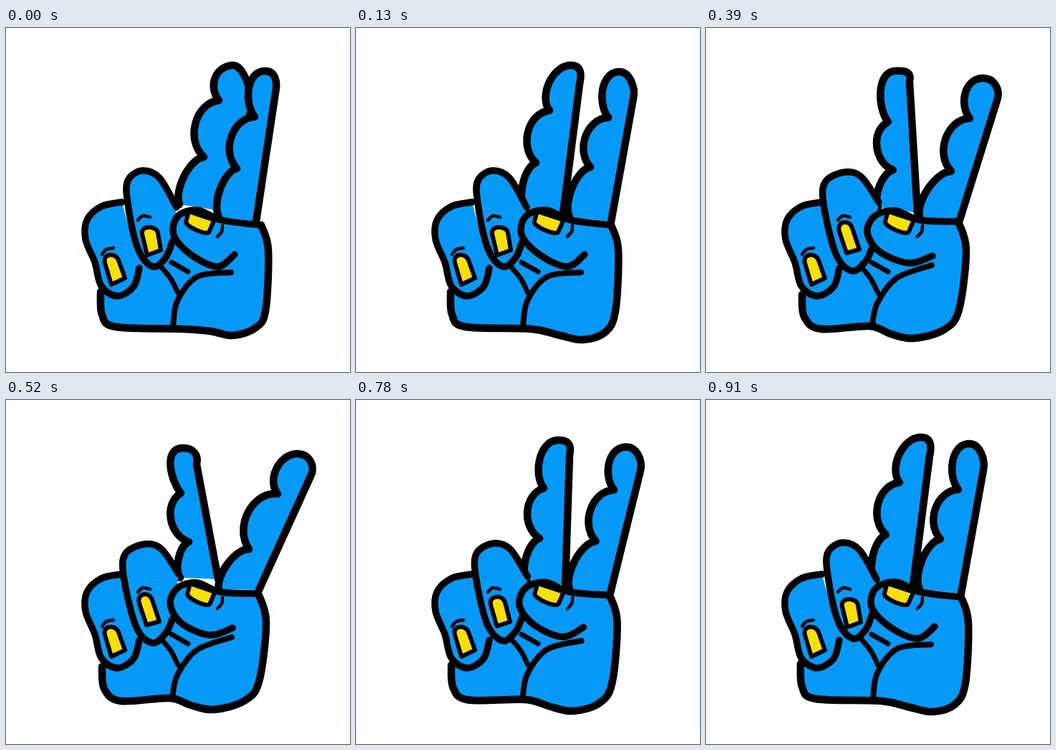
Animation, 480 px wide and 480 px high, one loop 1040 ms. Source, as an HTML page with a canvas:

```html
<!DOCTYPE html>
<html lang="en">
<head>
<meta charset="utf-8">
<title>Peace hand</title>
<style>
  html, body { margin: 0; width: 100%; height: 100%; overflow: hidden; background: #fff; }
  canvas { display: block; width: 100vmin; height: 100vmin; }
</style>
</head>
<body>
<canvas id="stage" width="480" height="480"></canvas>
<script>
const ctx = document.getElementById('stage').getContext('2d');
const SKIN = '#0799f8', NAIL = '#f7e00a';
const STEP = 130;

const mix = (a, b, t) => a.map((v, i) => v + (b[i] - v) * t);

// Value of a pose list at a fractional pose.
function at(poses, key) {
  const low = Math.floor(key);
  return mix(poses[low], poses[Math.min(low + 1, poses.length - 1)], key - low);
}

// Smooth curve through a flat list of x, y pairs.
function smooth(flat) {
  const p = [];
  for (let i = 0; i < flat.length; i += 2) p.push([flat[i], flat[i + 1]]);
  const path = new Path2D();
  path.moveTo(...p[0]);
  for (let i = 1; i < p.length; i++) {
    const a = p[i - 1], b = p[i], before = p[i - 2] || a, after = p[i + 1] || b;
    path.bezierCurveTo(
      a[0] + (b[0] - before[0]) / 6, a[1] + (b[1] - before[1]) / 6,
      b[0] - (after[0] - a[0]) / 6, b[1] - (after[1] - a[1]) / 6, ...b);
  }
  return path;
}

function line(path, width) {
  ctx.lineWidth = width;
  ctx.stroke(path);
}

function solid(path, width, color = SKIN) {
  ctx.fillStyle = color;
  ctx.fill(path);
  line(path, width);
}

// Rounded bump on the left of the segment, its depth relative to the length.
function scallop(path, x, y, toX, toY, depth) {
  const dx = toX - x, dy = toY - y;
  const nx = dy * depth, ny = -dx * depth;
  path.bezierCurveTo(x + dx * .2 + nx, y + dy * .2 + ny,
    x + dx * .85 + nx, y + dy * .85 + ny, toX, toY);
}

function finger([rootX, rootY, lowX, lowY, highX, highY, topX, topY, sideX, sideY, heelX, heelY]) {
  const path = new Path2D();
  path.moveTo(rootX, rootY);
  scallop(path, rootX, rootY, lowX, lowY, .22);
  scallop(path, lowX, lowY, highX, highY, .38);
  path.bezierCurveTo(highX - 15, highY - 19, topX - 25, topY + 2, topX, topY);
  path.bezierCurveTo(topX + 17, topY - 1, sideX + 3, sideY - 13, sideX, sideY);
  path.lineTo(heelX, heelY);
  solid(path, 10.5);
}

function nail([ax, ay, bx, by, cx, cy, dx, dy]) {
  const path = new Path2D(), bend = .45;
  path.moveTo(ax, ay);
  path.lineTo(bx, by);
  path.bezierCurveTo(bx + (bx - ax) * bend, by + (by - ay) * bend,
    cx + (cx - dx) * bend, cy + (cy - dy) * bend, cx, cy);
  path.lineTo(dx, dy);
  path.closePath();
  solid(path, 6, NAIL);
}

// Four poses each: root, two notches, top, side, heel.
const index = [
  [242, 246, 276, 180, 297, 101, 316, 52, 342, 110, 318, 258],
  [236, 255, 251, 188, 270, 115, 298, 52, 312, 78, 289, 258],
  [240, 250, 261, 198, 254, 131, 263, 60, 284, 75, 295, 258],
  [243, 248, 255, 198, 244, 130, 245, 67, 266, 90, 296, 250]
];
const middle = [
  [297, 264, 322, 196, 347, 124, 360, 60, 376, 90, 349, 270],
  [298, 264, 327, 194, 352, 125, 366, 61, 387, 98, 356, 270],
  [298, 264, 342, 200, 368, 126, 385, 70, 407, 98, 354, 268],
  [297, 264, 339, 208, 379, 131, 405, 75, 427, 102, 353, 265]
];

// The rest of the hand runs from a closed to a spread shape.
const palm = [
  [356, 275, 366, 310, 362, 395, 347, 421, 316, 431, 285, 425, 245, 420, 153, 417, 134, 400, 132, 368],
  [352, 270, 363, 310, 353, 393, 332, 421, 290, 433, 258, 427, 228, 416, 160, 420, 137, 403, 134, 372]
];
const ring = [
  [238, 250, 214, 209, 190, 199, 170, 213, 170, 245, 184, 308, 205, 333, 223, 320, 232, 298],
  [241, 243, 217, 208, 194, 201, 167, 214, 164, 245, 181, 315, 204, 339, 223, 325, 232, 306]
];
const thumb = [
  [319, 316, 295, 333, 258, 317, 233, 290, 238, 263, 266, 254, 300, 268, 356, 275],
  [316, 318, 283, 328, 242, 312, 225, 285, 236, 262, 264, 255, 299, 268, 352, 270]
];
const fold = [
  [314, 341, 267, 347, 239, 381, 233, 417],
  [315, 331, 266, 349, 239, 384, 232, 415]
];
const ringNail = [
  [197, 317, 190, 288, 212, 286, 216, 310],
  [196, 314, 186, 284, 204, 279, 214, 309]
];
const little = smooth([162, 243, 133, 249, 113, 268, 111, 295, 124, 327, 133, 360, 155, 374, 178, 361, 186, 335]);
const littleNail = [147, 358, 138, 328, 157, 324, 166, 349];
const thumbNail = [254, 256, 250, 270, 283, 284, 290, 268];
const webs = [[216, 333, 230, 350, 240, 370], [231, 327, 254, 340]].map(smooth);
const creases = [
  [302, 276, 301, 284, 295, 291],
  [184, 268, 191, 262, 201, 264],
  [134, 316, 140, 309, 150, 307]
].map(smooth);

// Spread, sideways thumb shift and palm sag of each pose.
const wobble = [[0, 1.5, -2], [0, -1.5, 4], [1, 0, 0], [1, 4, -1]];

function drawHand(key) {
  const [spread, shift, sag] = at(wobble, key);
  const shape = pair => mix(...pair, spread);

  ctx.fillStyle = '#fff';
  ctx.fillRect(0, 0, 480, 480);
  ctx.lineCap = ctx.lineJoin = 'round';

  finger(at(index, key));
  finger(at(middle, key));

  const edge = shape(palm).map((v, i, all) =>
    i % 2 && v > 415 && all[i - 1] > 250 ? v + sag : v);
  const body = smooth(edge);
  const inside = new Path2D(body);
  inside.lineTo(190, 300);
  inside.lineTo(250, 275);
  ctx.fillStyle = SKIN;
  ctx.fill(inside);
  line(body, 10.5);

  solid(little, 9.5);
  solid(smooth(shape(ring)), 9.5);
  line(smooth(shape(fold)), 8);
  webs.forEach(web => line(web, 7));

  // The thumb moves most at its left end and stays fixed at the wrist side.
  const slide = (v, i) => i % 2 ? v : v + shift * Math.max(0, 320 - v) / 90;
  solid(smooth(shape(thumb).map(slide)), 9.5);

  nail(thumbNail.map(slide));
  nail(shape(ringNail));
  nail(littleNail);
  creases.forEach(crease => line(crease, 4.5));
}

// Halfway poses end in .5; the hand opens and closes again.
const cycle = [0, 1, 1.5, 2, 3, 2, 1.5, 1];

function frame() {
  drawHand(cycle[Math.floor(performance.now() / STEP) % cycle.length]);
  requestAnimationFrame(frame);
}
frame();
</script>
</body>
</html>
```
